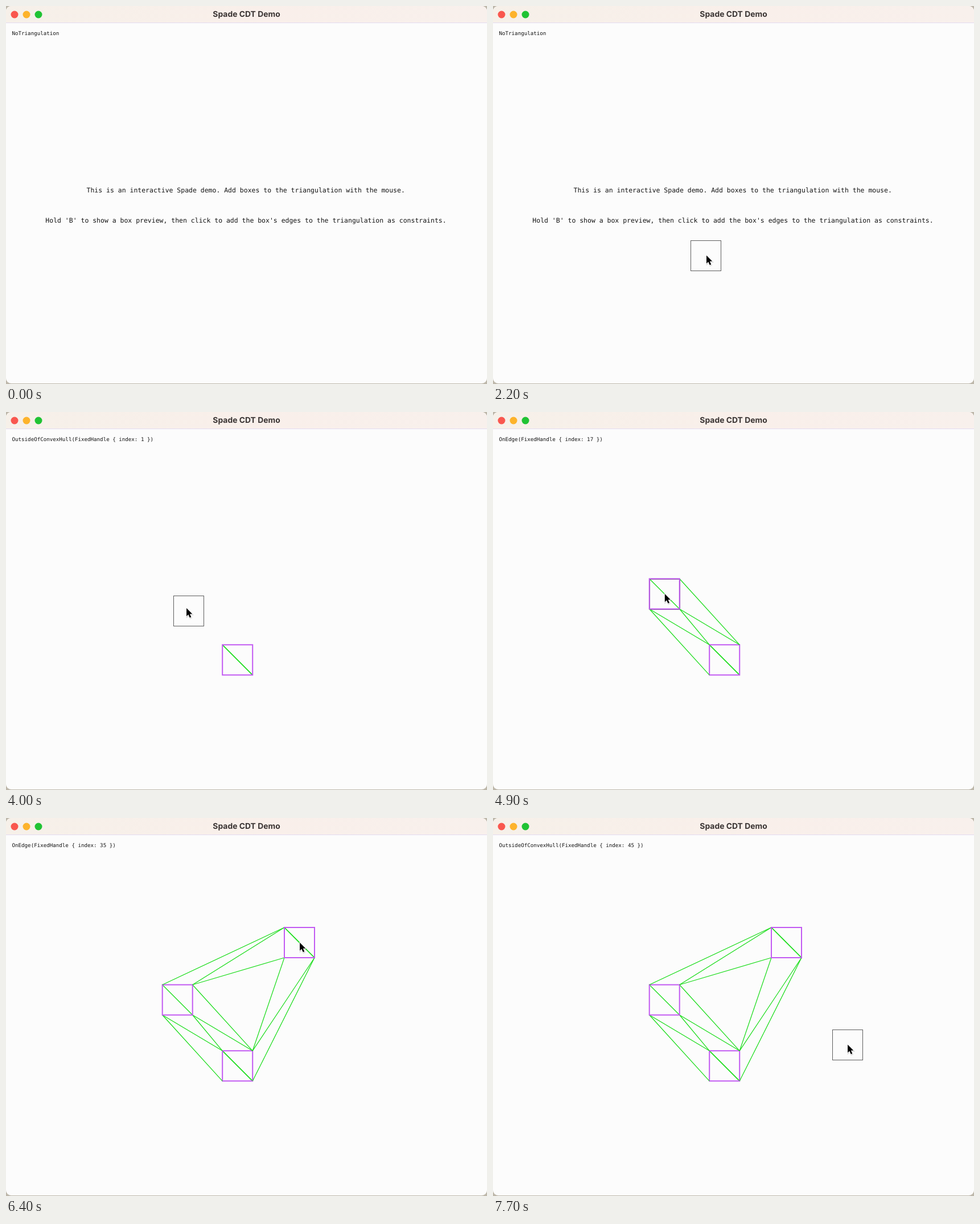
An HTML page that plays this animation: 845x663 px, repeating every 8 s.

```html
<!DOCTYPE html>
<html lang="en">
<head>
<meta charset="utf-8">
<title>Spade CDT Demo</title>
<style>
  html, body { margin: 0; width: 100%; height: 100%; overflow: hidden; background: #bdb7aa; }
  svg { display: block; width: 100vw; height: 100vh; }
  text { text-rendering: geometricPrecision; white-space: pre; }
  .mono { font-family: "DejaVu Sans Mono", monospace; font-size: 11.48px; fill: #141414; }
  .status { font-size: 9.18px; }
  .title { font: bold 13.9px Inter, sans-serif; fill: #3a3433; }
  .mid { text-anchor: middle; }
  .edge { stroke: #16dc16; stroke-width: 1.2; }
  .bold { stroke-width: 1.7; }
  .wall { fill: none; stroke: #c25af2; stroke-width: 2; }
  .preview { fill: none; stroke: #5e5e5e; shape-rendering: crispEdges; }
</style>
</head>
<body>
<svg viewBox="0 0 845 663" preserveAspectRatio="none">
  <defs>
    <linearGradient id="bar">
      <stop offset="0" stop-color="#f6f0e9"/>
      <stop offset=".55" stop-color="#f9efea"/>
      <stop offset="1" stop-color="#f8f0ec"/>
    </linearGradient>
    <clipPath id="frame"><rect width="845" height="662" rx="9"/></clipPath>
    <path id="arrow" d="M0 0V14.2L3.2 11.2L5.7 16.8L8.2 15.7L5.8 10.2H10.2Z"/>
  </defs>
  <rect width="845" height="663" fill="#bdb7aa"/>
  <g clip-path="url(#frame)">
    <rect width="845" height="663" fill="#fcfcfc"/>
    <rect width="845" height="29" fill="url(#bar)"/>
    <rect y="29" width="845" height="1" fill="#e3dbf0"/>
  </g>
  <circle cx="15" cy="15" r="6.5" fill="#f9574f"/>
  <circle cx="36" cy="15" r="6.5" fill="#fdb32c"/>
  <circle cx="57" cy="15" r="6.5" fill="#20c334"/>
  <text class="title mid" x="422.5" y="19">Spade CDT Demo</text>
  <text class="mono status" id="status" x="10.5" y="51"></text>
  <g id="help">
    <text class="mono mid" x="421.2" y="326.5">This is an interactive Spade demo. Add boxes to the triangulation with the mouse.</text>
    <text class="mono mid" x="421.5" y="379.5">Hold 'B' to show a box preview, then click to add the box's edges to the triangulation as constraints.</text>
  </g>
  <rect class="preview" id="preview" width="53" height="53"/>
  <g id="mesh"></g>
  <g id="cursor">
    <use href="#arrow" x=".6" y="1.4" stroke="#000" stroke-width="2" opacity=".12"/>
    <use href="#arrow" stroke="#fff" stroke-width="1.6" stroke-linejoin="round"/>
    <use href="#arrow" fill="#000"/>
  </g>
</svg>
<script>
const LOOP = 8000, STEP = 100, HALF = 26.5, LAG = 20;
const $ = id => document.getElementById(id);

// Each click adds one box and the edges that join it to the mesh.
const boxes = [
  { at: 3700, x: 406.7, y: 434.8, bold: true, edges: [] },
  { at: 4900, x: 301.2, y: 319, edges: ["1tr 0tr", "1br 0tl", "1br 0tr", "1bl 0tl", "1bl 0bl"] },
  { at: 6400, x: 515.5, y: 218.5, bold: true,
    edges: ["1tl 2tl", "1tr 2tl", "1tr 2bl", "0tr 2bl", "0tr 2br", "0br 2br"] }
];

// Mouse path: time, x, y
const path = [
  [500, 411, 380], [700, 421, 451], [900, 421, 451], [1400, 385, 446], [1900, 366, 438],
  [2200, 374.4, 437.5], [2800, 407, 434.7], [3700, 407, 434.7], [4000, 316.5, 344],
  [4300, 301.2, 319], [4900, 301.2, 319], [5500, 457, 307.5], [5900, 515.5, 218.5],
  [6400, 515.5, 218.5], [7200, 582, 381], [7700, 622.5, 397.5]
];

const edgeOf = n => `OnEdge(FixedHandle { index: ${n} })`;
const outside = n => `OutsideOfConvexHull(FixedHandle { index: ${n} })`;
const statuses = [
  [0, "NoTriangulation"], [3700, edgeOf(8)], [3800, outside(1)], [4900, edgeOf(17)],
  [5100, outside(19)], [6400, edgeOf(35)], [6600, outside(45)]
];

function add(parent, tag, attrs) {
  const el = document.createElementNS("http://www.w3.org/2000/svg", tag);
  for (const k in attrs) el.setAttribute(k, attrs[k]);
  return parent.appendChild(el);
}

function corner(name) {
  const b = boxes[name[0]];
  return [b.x + (name[2] === "l" ? -HALF : HALF), b.y + (name[1] === "t" ? -HALF : HALF)];
}

function drawEdge(parent, pair, bold) {
  const [[x1, y1], [x2, y2]] = pair.split(" ").map(corner);
  add(parent, "line", { x1, y1, x2, y2, class: bold ? "edge bold" : "edge" });
}

boxes.forEach((b, i) => {
  b.el = add($("mesh"), "g", {});
  drawEdge(b.el, `${i}tl ${i}br`, b.bold);
  b.edges.forEach(e => drawEdge(b.el, e));
  add(b.el, "rect", { x: b.x - HALF, y: b.y - HALF, width: 2 * HALF, height: 2 * HALF, class: "wall" });
});

// Slope at a key, zero where the mouse rests.
function slope(i, k) {
  const p = path[i - 1], q = path[i], r = path[i + 1];
  if (!p || !r || p[k] === q[k] || q[k] === r[k]) return 0;
  return (r[k] - p[k]) / (r[0] - p[0]);
}

function mouse(t) {
  const last = path.length - 1;
  if (t <= path[0][0]) return path[0].slice(1);
  if (t >= path[last][0]) return path[last].slice(1);
  const i = path.findIndex(p => p[0] > t) - 1;
  const a = path[i], b = path[i + 1], d = b[0] - a[0], u = (t - a[0]) / d, v = 1 - u;
  return [1, 2].map(k =>
    v * v * (1 + 2 * u) * a[k] + u * u * (3 - 2 * u) * b[k] +
    u * v * d * (v * slope(i, k) - u * slope(i + 1, k)));
}

const show = (el, on) => el.setAttribute("visibility", on ? "visible" : "hidden");

function render(t) {
  const [x, y] = mouse(t), [px, py] = mouse(t - LAG);
  $("cursor").setAttribute("transform", `translate(${x + 0.6} ${y})`);
  $("preview").setAttribute("x", Math.round(px - HALF) + 0.5);
  $("preview").setAttribute("y", Math.round(py - HALF) + 0.5);
  show($("cursor"), t >= 500);
  show($("preview"), t >= 900);
  show($("help"), t < boxes[0].at);
  boxes.forEach(b => show(b.el, t >= b.at));
  $("status").textContent = statuses.filter(s => s[0] <= t).pop()[1];
}

const start = performance.now();
function tick() {
  const t = (performance.now() - start) % LOOP;
  render(Math.floor(t / STEP) * STEP);
  requestAnimationFrame(tick);
}
tick();
</script>
</body>
</html>
```
